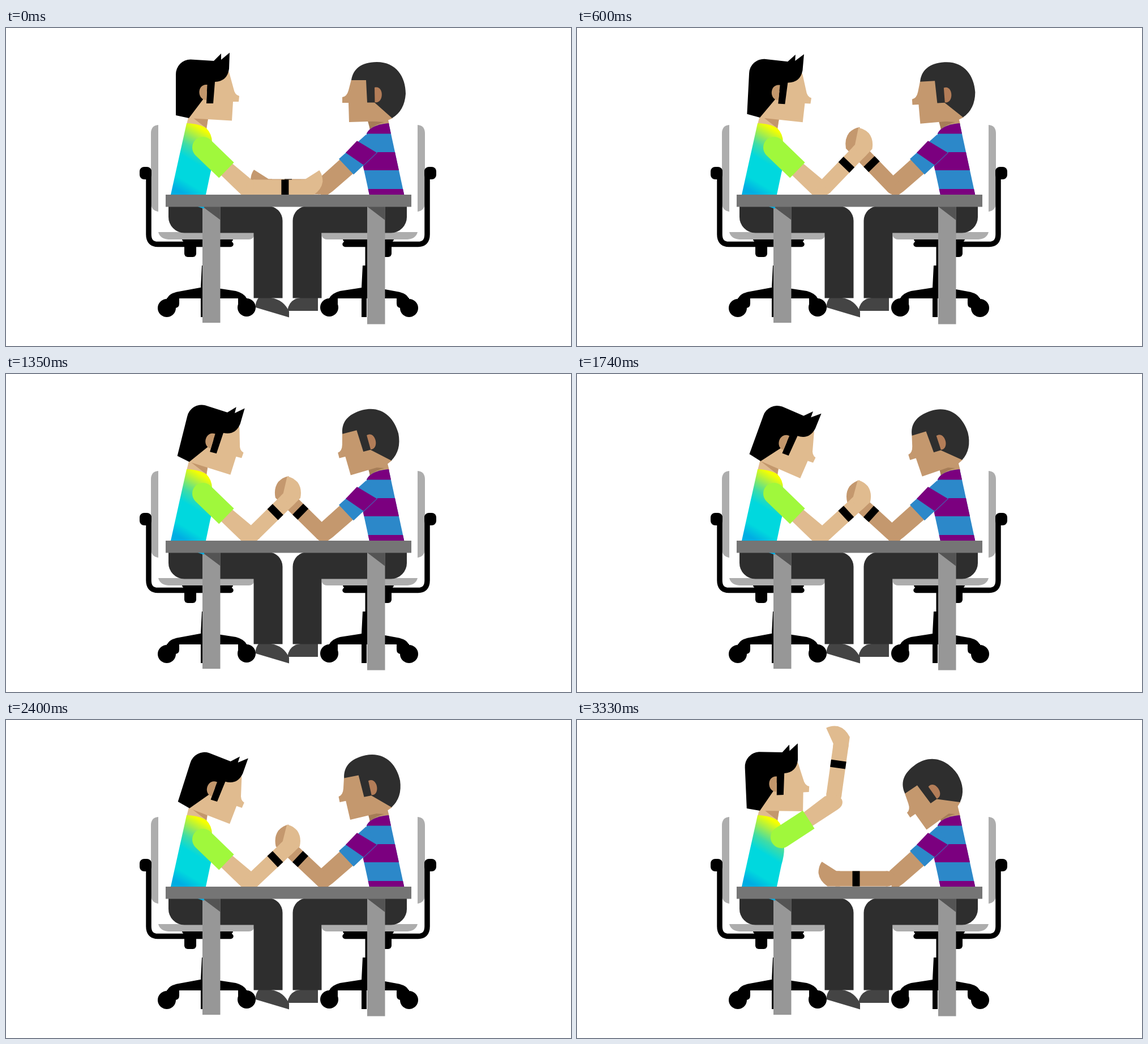
An HTML page for the animation above (3.63 s loop, 998 by 561 pixels).

```html
<!DOCTYPE html>
<html lang="en">
<head>
<meta charset="utf-8">
<title>Arm wrestling</title>
<style>
  html, body { margin: 0; width: 100%; height: 100%; overflow: hidden; background: #fff; }
  svg { display: block; width: 100vw; height: 100vh; }
  .light { fill: #e0bb8f; }
  .tan { fill: #c4986e; }
  .blue { fill: #2c88c9; }
  .purple { fill: #7b007f; }
  .dark { fill: #2e2e2e; }
  .shoe { fill: #444; }
  .pad { fill: #adadad; }
</style>
</head>
<body>
<svg viewBox="0 0 998 561" preserveAspectRatio="none">
  <defs>
    <linearGradient id="dye" gradientUnits="userSpaceOnUse" x1="350" y1="172" x2="281" y2="288">
      <stop offset=".05" stop-color="#f5ff00"/>
      <stop offset=".18" stop-color="#a5ee4a"/>
      <stop offset=".33" stop-color="#3fdca6"/>
      <stop offset=".48" stop-color="#00d8de"/>
      <stop offset=".75" stop-color="#00d8de"/>
      <stop offset=".9" stop-color="#00aee3"/>
    </linearGradient>
    <g id="chair">
      <path class="pad" d="M269,171V324Q256,322 256,308V186Q256,172 269,171Z"/>
      <path d="M252,252V364Q252,381.5 268,381.5H397" fill="none" stroke="#000" stroke-width="9.5" stroke-linecap="round"/>
      <rect x="236" y="245" width="21" height="22" rx="8"/>
      <path d="M311,373H401Q400,378 395,378H317Q312,378 311,373Z"/>
      <rect x="315" y="380" width="21" height="24" rx="6"/>
      <path d="M349,376H361.500V419H366L368,458V510H359V476H347V510H344V458L346,419H349Z"/>
      <path d="M285,477Q288,468 305,465L343,458H367L406,464Q421,468 425,477Z"/>
      <path d="M284,476H306V486Q306,494 298,494H284ZM425,476H410V486Q410,494 418,494H425Z"/>
      <circle cx="284" cy="494" r="16"/>
      <circle cx="425" cy="493" r="16"/>
      <path class="pad" d="M269,360H438V367Q436,373 428,373H287Q272,372 269,360Z"/>
    </g>
    <path id="legs" class="dark" d="M287,314V333A28,28 0 0 0 315,361.500H437.500V476.500H488.500V340A26,26 0 0 0 462.500,314Z"/>
    <g id="forearm">
      <circle r="13.500"/>
      <path d="M0,-13.500H92V13.500H0Z"/>
    </g>
    <path id="hand" d="M84,-13.500H90L116,-30Q122,-22 122,-10Q120,4 106,13.500H84Z"/>
    <rect id="band" x="49" y="-13.500" width="13" height="27" fill="#000"/>
  </defs>

  <use href="#chair"/>
  <use href="#chair" transform="translate(996) scale(-1 1)"/>

  <path class="shoe" d="M446,476Q440,484 441,493L500,510.500V500Q490,479 468,476Z"/>
  <path class="shoe" d="M551,476V499H497Q500,478 520,476Z"/>
  <use href="#legs"/>
  <use href="#legs" transform="translate(995) scale(-1 1)"/>

  <!-- right person -->
  <path class="tan" d="M641,158L672,150L677,170L643,184Z"/>
  <path d="M639,164L643,179Q652,170 668,166Z" fill="#a67d57"/>
  <g id="headR">
    <path class="tan" d="M610,91L605,110Q602,121 594,122V132H605L606,166L672,164L683,159L670,120L636,90Z"/>
    <path class="dark" d="M610,92C613,73 626,60.500 655,60C689,60 706,86 706,116Q704,146 682,159L651,131.500H638L636,92Z"/>
    <path d="M651,105C668,100 668,134 651.500,131Z" fill="#b37d58"/>
  </g>
  <clipPath id="torso"><path d="M676,168L703.500,295H642L630,240L637,186Q644,171 676,168Z"/></clipPath>
  <g clip-path="url(#torso)">
    <rect class="blue" x="625" y="168" width="82" height="127"/>
    <path class="purple" d="M625,168H707V186.500H625ZM625,219H707V251H625ZM625,284H707V295H625Z"/>
  </g>
  <path class="tan" d="M592,230L552,266L556,296H566L577,288L614,256Z"/>
  <g id="armR" class="tan">
    <use href="#forearm"/><use id="handR" href="#hand"/><use href="#band"/>
  </g>
  <path class="blue" d="M636,188L657,218L614,258.500L588,231Z"/>
  <path class="purple" d="M620,199L655,220L632,242L600,220Z"/>
  <path d="M656,219.500L631,243" fill="none" stroke="#2c88c9"/>

  <!-- left person -->
  <path class="light" d="M324,150L357,158L354,181L319,170Z"/>
  <path d="M322,152L357,160L354,177Z" fill="#c3976c"/>
  <g id="headL">
    <path class="light" d="M330,120L380,70L394,78L402,107Q404,118 412,120L411,130H401L399,163.500L322,159Z"/>
    <path d="M300,154V82A26,26 0 0 1 326,55.500L367,58L380,45V56L395,43.500L394,72Q391,94 369,95L366,133H354L355,110L348,126L323,159Z"/>
    <path d="M355.500,100C337,98 337,127 354,127Z" fill="#c3976c"/>
  </g>
  <path d="M319,168Q343,169 354,177Q365,188 364,205L366,225Q366,240 361,256L353,294L350,319L341,316L291,294Z" fill="url(#dye)"/>
  <g id="armL" class="light">
    <path d="M50,-15L104,-19L124,-10L126,2Q124,13 110,13H50Z"/>
    <g id="foreL">
      <use href="#forearm"/><use id="handL" href="#hand"/><use href="#band"/>
    </g>
  </g>
  <path id="sleeveL" d="M0,-19H57.500V19H0A19,19 0 0 1 0,-19Z" fill="#a0f83c"/>

  <!-- table -->
  <path d="M347,315H378.500V520H347ZM638,315H669.500V522.500H638Z" fill="#979797"/>
  <path d="M347,315H378.500V338.500ZM638,315H669.500V339Z" fill="#545454"/>
  <path d="M341,315H350V319Z" fill="#00aee3"/>
  <rect x="282" y="294" width="434" height="21.500" fill="#757575"/>
</svg>
<script>
const LOOP = 3630, END = 3330, TICK = 30;

const clamp = u => Math.min(1, Math.max(0, u));
const mix = (a, b, u) => a + (b - a) * u;
const span = (from, to, t) => clamp((t - from) / (to - from));
const ramp = (from, to, t) => {
  const u = span(from, to, t);
  return u * u * (3 - 2 * u);
};
// Swells from 0 to 1 and back once per period.
const swell = (period, t) => Math.sin(Math.PI * t / period) ** 2;
const place = (id, transform) => document.getElementById(id).setAttribute('transform', transform);

function draw(t) {
  // Reach, strain, slam, cheer.
  const reachL = ramp(0, 360, t), reachR = ramp(210, 600, t);
  const lean = ramp(510, 880, t);
  const slam = ramp(2430, 2600, t), hold = 1 - slam;
  const fall = ramp(2580, 2850, t);
  const lift = 1 - (1 - span(2600, 3180, t)) ** 4;
  const since = Math.max(0, t - 900);
  const tired = span(900, 2400, t);
  const rock = swell(840, since) * hold;
  const sink = swell(2160, since) * hold;

  const nod = swell(600, Math.min(t, 600));
  const tiltL = 20 * lean - 6 * rock - 22.5 * ramp(2740, 3330, t);
  const tiltR = mix(-7.5 * nod - 22 * lean + 8.6 * tired + 5 * rock, -34, fall);
  place('headL', `translate(0 ${3 * tired * hold}) rotate(${tiltL} 343.5 159.5)`);
  place('headR', `rotate(${tiltR} 656.5 161)`);

  // The shoulder slides forward as the arm goes up.
  const shoulder = mix(43.9, -33, lift);
  const sleeve = `translate(${348 + 13 * lift} ${211 - 4 * lift}) rotate(${shoulder})`;
  place('sleeveL', sleeve);
  place('armL', sleeve);

  const bend = 46 - 4 * sink;
  const foreL = mix(-bend * reachL * hold, -82, lift);
  place('foreL', `translate(${113 + 5 * lift} ${5 * sink - 11.5}) rotate(${foreL - shoulder})`);

  const elbowR = mix(554 + 5 * reachR + 2 * sink, 548.5, slam);
  place('armR', `translate(${elbowR} ${280 + 5 * sink}) rotate(${bend * reachR * hold}) scale(-1 1)`);

  const grip = `translate(${reachR * hold - 7 * sink})`;
  place('handL', grip);
  place('handR', grip);
}

function frame() {
  const t = performance.now() % LOOP;
  draw(Math.min(END, Math.floor(t / TICK) * TICK));
  requestAnimationFrame(frame);
}
frame();
</script>
</body>
</html>
```
